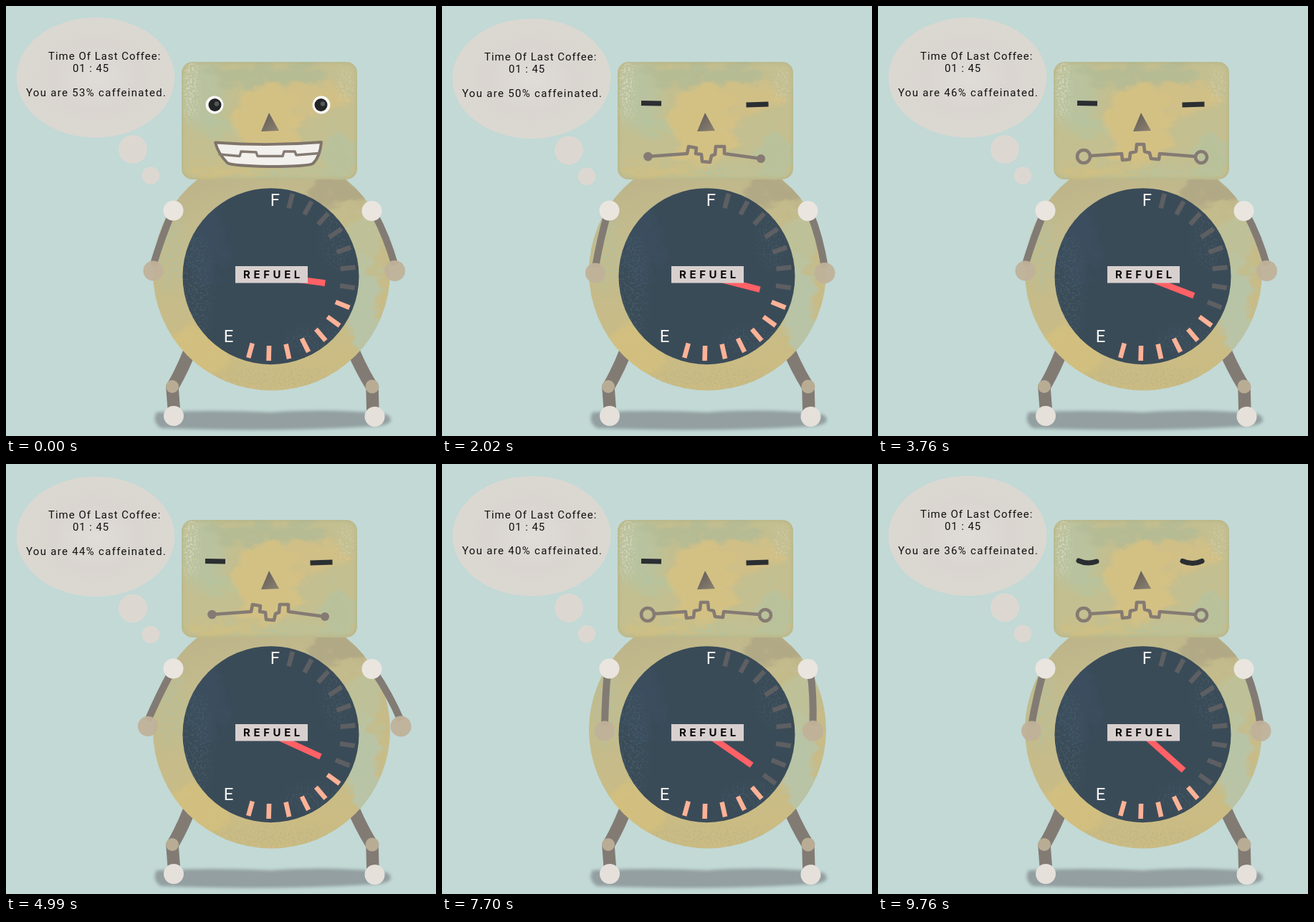
An HTML page that plays this animation: 600x600 px, repeating every 9860 ms.

```html
<!DOCTYPE html>
<html lang="en">
<head>
<meta charset="utf-8">
<title>Caffeine robot</title>
<style>
  html, body { margin: 0; width: 100%; height: 100%; overflow: hidden; background: #c2d9d6; }
  svg { position: absolute; left: 0; top: 0; width: 600px; height: 600px; }
  #live { will-change: transform; }
  text { font-family: Roboto, sans-serif; }
  .note text { font-size: 15px; fill: #111; white-space: pre; }
  .mark { font-size: 24px; fill: #f6f6f4; text-anchor: middle; }
  .refuel { font: 700 15px Inter, sans-serif; letter-spacing: 4.6px; fill: #0b0b0b; }
  .line { fill: none; stroke: #857b73; stroke-width: 4.6; stroke-linejoin: round; stroke-linecap: round; }
  .lid { fill: none; stroke: #2b2f32; stroke-width: 7; }
  .limb { fill: none; stroke: #827b74; stroke-linejoin: round; }
</style>
</head>
<body>
<svg viewBox="0 0 600 600">
  <defs>
    <filter id="soft" x="-50%" y="-50%" width="200%" height="200%"><feGaussianBlur stdDeviation="9"/></filter>
    <filter id="smudge" x="-10%" y="-50%" width="120%" height="200%"><feGaussianBlur stdDeviation="2.2"/></filter>
    <filter id="smear" x="-60%" y="-60%" width="220%" height="220%">
      <feTurbulence type="fractalNoise" baseFrequency=".03 .05" numOctaves="4" seed="7"/>
      <feGaussianBlur in="SourceGraphic" stdDeviation="4" result="spot"/>
      <feTurbulence type="fractalNoise" baseFrequency=".03 .05" numOctaves="4" seed="7"/>
      <feDisplacementMap in="spot" scale="44" xChannelSelector="R" yChannelSelector="G"/>
    </filter>
    <filter id="grain" x="-40%" y="-40%" width="180%" height="180%">
      <feTurbulence type="fractalNoise" baseFrequency=".35" numOctaves="2" seed="4"/>
      <feColorMatrix values="0 0 0 0 0  0 0 0 0 0  0 0 0 0 0  7 0 0 0 -3.4" result="dots"/>
      <feGaussianBlur in="SourceGraphic" stdDeviation="7"/>
      <feComposite operator="in" in2="dots"/>
    </filter>
    <linearGradient id="skin" x1="0" y1="0" x2=".25" y2="1">
      <stop offset="0" stop-color="#b8ae86"/><stop offset=".35" stop-color="#c3bb8d"/>
      <stop offset="1" stop-color="#cbbc84"/>
    </linearGradient>
    <linearGradient id="nose" x1="0" y1="0" x2="1" y2="1">
      <stop offset="0" stop-color="#5f5853"/><stop offset="1" stop-color="#8d8373"/>
    </linearGradient>
    <clipPath id="bodyClip"><circle cx="370.5" cy="371" r="165.5"/></clipPath>
    <clipPath id="headClip"><rect x="245" y="78" width="245" height="164" rx="15"/></clipPath>
    <clipPath id="dialClip"><circle cx="369.5" cy="377.2" r="123"/></clipPath>
  </defs>

  <rect width="600" height="600" fill="#c2d9d6"/>
  <g filter="url(#smudge)" fill="#939fa0">
    <path d="M210 567Q290 563 370 567Q460 561 532 570Q546 582 520 586Q370 595 216 589Q203 580 210 567Z"/>
  </g>
  <g class="limb" stroke-width="17.5">
    <path d="M256 482Q246 508 232 532L235 572"/>
    <path d="M485 482Q496 508 511 532L512 572"/>
  </g>
  <g fill="#b9ac94"><circle cx="232" cy="531" r="9"/><circle cx="511" cy="531" r="9.5"/></g>
  <g fill="#e5e0da"><circle cx="234" cy="572" r="14"/><circle cx="514.5" cy="573" r="14"/></g>

  <g clip-path="url(#bodyClip)">
    <rect x="200" y="200" width="340" height="340" fill="url(#skin)"/>
    <g id="bodyPaint"></g>
  </g>
  <g clip-path="url(#headClip)">
    <rect x="245" y="78" width="245" height="164" fill="#c4bf90"/>
    <g id="headPaint"></g>
    <rect x="245" y="78" width="245" height="164" rx="15" fill="none" stroke="#a9ab84" stroke-opacity=".45" stroke-width="4" filter="url(#smudge)"/>
  </g>
  <path d="M367 149L381 174L356 175Z" fill="url(#nose)"/>
  <g clip-path="url(#dialClip)">
    <rect x="245" y="250" width="250" height="252" fill="#3a4b58"/>
    <g id="dialPaint"></g>
  </g>
  <text class="mark" x="375.5" y="279">F</text>
  <text class="mark" x="310.5" y="468.5">E</text>
</svg>

<svg id="live" viewBox="0 0 600 600">
  <defs>
    <radialGradient id="cloud">
      <stop offset="0" stop-color="#e0dcd7"/><stop offset=".55" stop-color="#dad5d0"/>
      <stop offset="1" stop-color="#dbd8d1"/>
    </radialGradient>
  </defs>
  <g id="bubble" class="note">
    <g fill="#dcd8d1">
      <ellipse cx="125" cy="99.8" rx="110.5" ry="83.8" fill="url(#cloud)"/>
      <circle cx="177" cy="200" r="20"/><circle cx="202" cy="236.5" r="12.3"/>
    </g>
    <text x="59" y="75" letter-spacing="1">Time Of Last Coffee:</text>
    <text x="93" y="92" letter-spacing=".9">01 : 45</text>
    <text id="level" x="28" y="125.5" letter-spacing="1.3"></text>
  </g>

  <g id="awake">
    <g fill="#fbfaf7"><circle cx="291" cy="138" r="12.4"/><circle cx="440" cy="138" r="12.4"/></g>
    <g fill="#222426"><circle cx="291.5" cy="138" r="9"/><circle cx="439.5" cy="138" r="9"/></g>
    <g fill="#55585a"><circle cx="294" cy="136.5" r="3.2"/><circle cx="442" cy="136.5" r="3.2"/></g>
    <path d="M292 190.5Q366 196 440 190Q438 211 428 220Q420 224 366 224Q316 223 309 219Q296 206 292 190.5Z" fill="#f3f1ed" stroke="#7f756b" stroke-width="3.8" stroke-linejoin="round"/>
    <path class="line" style="stroke-width:3.4" d="M298 207L326 209.500L328 203L349 204L351 209.500L386 209.500L388 203L403 203L405 208L437 205.500"/>
  </g>
  <g id="tired" class="lid"><path d="M278 135.5L306 136"/><path d="M424.5 138L455.5 137"/></g>
  <g id="asleep" class="lid" stroke-linecap="round"><path d="M280 135Q292 140.500 305 136"/><path d="M425 135.500Q439 141.500 452 135.500"/></g>
  <g id="mouthA" class="line">
    <path d="M287 210L342 206L344 196L355 198L354 206L362 207L363 217L374 218L376 209L381 207L382 196L394 196L394 206L445 213"/>
    <g fill="#857b73" stroke="none"><circle cx="287.500" cy="210" r="6.300"/><circle cx="445" cy="213" r="6"/></g>
  </g>
  <g id="mouthB" class="line">
    <path d="M297 209L340 206L341 215L351 214L352 205L360 203L361 193L371 193L372 203L379 205L381 213L392 214L393 206L443 210"/>
    <circle cx="287" cy="210" r="9"/><circle cx="451" cy="211" r="8"/>
  </g>

  <g id="ticks"></g>
  <rect id="needle" x="369.500" y="372.200" width="76.500" height="8.600" fill="#ff6166"/>
  <rect x="320" y="363" width="101" height="23.500" fill="#d8d0ce"/>
  <text class="refuel" x="331" y="380.300">REFUEL</text>

  <g class="limb" stroke-width="10"><path id="armL"/><path id="armR"/></g>
  <g fill="#bfb199" fill-opacity=".94"><circle id="handL" r="14"/><circle id="handR" r="14.500"/></g>
  <g fill="#eae5df"><circle cx="233.500" cy="285.500" r="14"/><circle cx="510.500" cy="286" r="14"/></g>
</svg>

<script>
const $ = id => document.getElementById(id);
const LOOP = 9860, STEP = 291.67;
const HUB = '369.5 376.5';

function make(parent, tag, attrs) {
  const el = document.createElementNS('http://www.w3.org/2000/svg', tag);
  set(el, attrs);
  return parent.appendChild(el);
}
function set(el, attrs) {
  for (const key in attrs) el.setAttribute(key, attrs[key]);
}
function show(id, on) {
  $(id).style.display = on ? '' : 'none';
}
function dab(parent, brush, fill, opacity, cx, cy, rx, ry) {
  make($(parent), 'ellipse', { cx, cy, rx, ry, fill, opacity, filter: `url(#${brush})` });
}

dab('bodyPaint', 'smear', '#b5c6ae', .8, 500, 420, 26, 64);
dab('bodyPaint', 'smear', '#b9c5a2', .6, 498, 330, 26, 40);
dab('bodyPaint', 'smear', '#aaa282', .7, 470, 258, 56, 18);
dab('bodyPaint', 'smear', '#d6c17d', .7, 270, 480, 46, 34);
dab('bodyPaint', 'grain', '#a9c4ab', .6, 230, 340, 20, 60);
dab('bodyPaint', 'grain', '#b4ad84', .4, 380, 520, 110, 14);

dab('headPaint', 'soft', '#b4c4a4', .7, 275, 125, 30, 50);
dab('headPaint', 'smear', '#acb997', .6, 370, 94, 90, 14);
dab('headPaint', 'smear', '#d5c183', .9, 365, 165, 46, 60);
dab('headPaint', 'smear', '#d5c083', .75, 430, 128, 44, 18);
dab('headPaint', 'smear', '#b2c4a4', .6, 462, 205, 22, 36);
dab('headPaint', 'smear', '#d4bf7e', .6, 310, 230, 56, 10);
dab('headPaint', 'smear', '#b0c6a4', .5, 300, 170, 26, 14);
dab('headPaint', 'grain', '#e1e2d4', .7, 257, 110, 9, 50);
dab('headPaint', 'grain', '#dfe0c8', .4, 474, 110, 10, 26);
dab('headPaint', 'grain', '#a4c6ad', .7, 390, 232, 60, 9);

dab('dialPaint', 'smear', '#40556a', .35, 280, 335, 26, 55);
dab('dialPaint', 'grain', '#4c6670', .5, 266, 390, 20, 80);
dab('dialPaint', 'grain', '#566c74', .25, 462, 320, 24, 50);
dab('dialPaint', 'grain', '#4c646e', .4, 440, 465, 50, 20);

const ticks = Array.from({ length: 14 }, (_, i) => make($('ticks'), 'rect', {
  x: 467, y: 373.2, width: 21, height: 6.6,
  transform: `rotate(${105.3 - 13.88 * i} ${HUB})`
}));

// hand places from the innermost to the outermost pose
const poses = {
  A: { l: 225, r: 519.5, y: 372.5 },
  B: { l: 212, r: 536, y: 372.5 },
  C: { l: 203.5, r: 544.5, y: 369.5 },
  D: { l: 196, r: 553, y: 366 }
};

function drawArm(side, shoulder, hand, y, bulge) {
  const mid = (shoulder + hand) / 2 + bulge;
  set($('arm' + side), { d: `M${shoulder} 290Q${mid} 322 ${hand} ${y - 8}` });
  set($('hand' + side), { cx: hand, cy: y });
}

function draw(t) {
  const minute = Math.floor((t + 500) / 1000);
  const left = 32 - minute;
  const percent = Math.floor((1 - (28 + minute) / 60) * 100);
  $('level').textContent = `You are ${percent}% caffeinated.`;
  set($('needle'), { transform: `rotate(${7.6 + 3.42 * minute} ${HUB})` });
  const lit = Math.floor((left - 1) / 4);
  ticks.forEach((tick, i) => set(tick, { fill: i < lit ? '#fdb297' : '#5d5f62' }));

  const n = Math.floor((t + 25) / STEP);
  const awake = percent > 50, asleep = percent < 40;
  const second = (n % 2 === 0) !== asleep;
  show('awake', awake);
  show('tired', !awake && !asleep);
  show('asleep', asleep);
  show('mouthA', !awake && !second);
  show('mouthB', !awake && second);

  const pose = poses[n < 4 ? 'CDCB'[n] : 'CBABCD'[n % 6]];
  drawArm('L', 231, pose.l + 2, pose.y, -1);
  drawArm('R', 514, pose.r - 2, pose.y, 3);

  const bob = .75 * (1 - Math.cos(2 * Math.PI * t / 3450));
  set($('bubble'), { transform: `translate(0 ${bob.toFixed(2)})` });
}

const start = performance.now();
function tick() {
  draw((performance.now() - start) % LOOP);
  requestAnimationFrame(tick);
}
tick();
</script>
</body>
</html>
```
